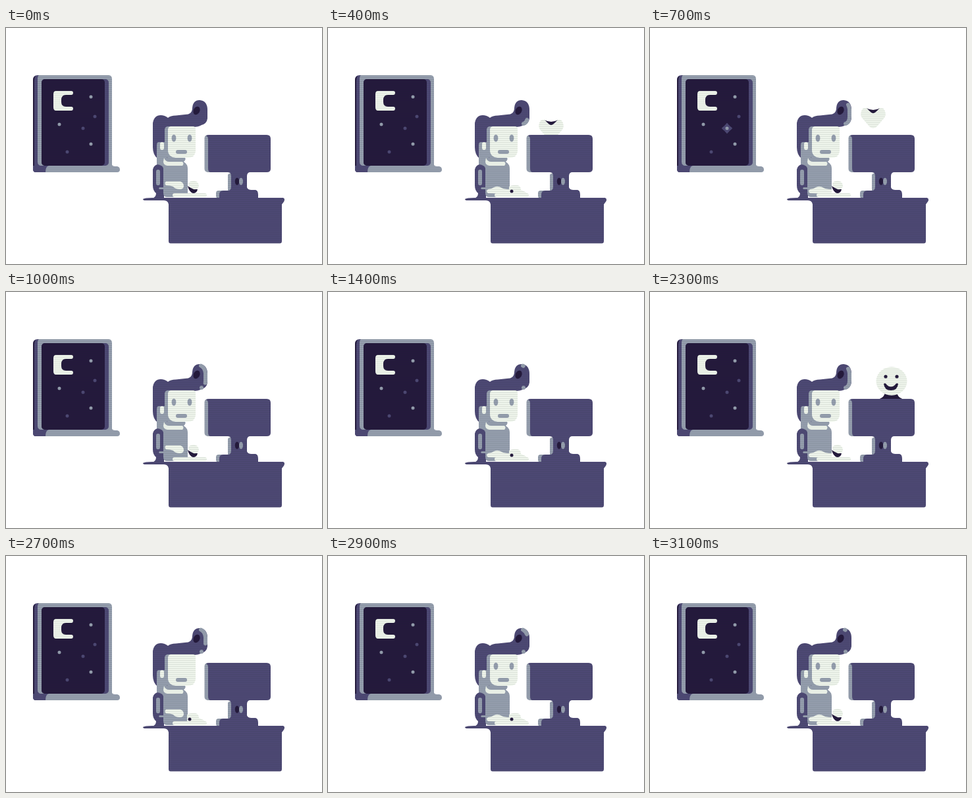
An HTML page for the animation above (3.2 s loop, 480 px wide and 360 px high).

```html
<!DOCTYPE html>
<html lang="en">
<head>
<meta charset="utf-8">
<title>Night desk</title>
<style>
  html, body { margin: 0; width: 100%; height: 100%; overflow: hidden; background: #fff; }
  svg { display: block; width: 100vw; height: 100vh; }
  .purple { fill: #4d4874; }
  .dark { fill: #24193c; }
  .gray { fill: #959eae; }
  .light { fill: #eff5ec; }
</style>
</head>
<body>
<svg viewBox="0 0 480 360">
  <defs>
    <clipPath id="aboveScreen"><rect x="300" width="110" height="165"/></clipPath>
    <filter id="scanlines" filterUnits="userSpaceOnUse" x="0" y="0" width="480" height="360" color-interpolation-filters="sRGB">
      <feFlood x="0" y="0" width="480" height="1" flood-color="#203028" flood-opacity=".1"/>
      <feOffset x="0" y="0" width="480" height="3"/>
      <feTile x="0" y="0" width="480" height="360" result="lines"/>
      <feComposite in="lines" in2="SourceGraphic" operator="atop"/>
    </filter>
  </defs>

  <g filter="url(#scanlines)">
  <g id="window">
    <path class="purple" d="M48 72H70V220H45Q41 220 41 215V79Q41 72 48 72Z"/>
    <path class="dark" d="M45 73Q41 75 41 80V213Q41 217 43 219V80Q43 76 45 73Z"/>
    <path class="gray" d="M50 72H156Q161 72 161 78V208Q161 211 166 211H169Q173 212 173 216T169 220H60V210H54Q48 210 48 204V78Q48 73 50 72Z"/>
    <path class="purple" d="M41 210H65Q60 211 60 220H45Q41 220 41 215Z"/>
    <rect class="purple" x="54" y="78" width="102" height="132" rx="5"/>
    <rect class="dark" x="54" y="78" width="96" height="132" rx="5"/>
    <path class="light" d="M76 96H99Q102 96 102 99T99 102H91Q84 102 84 110V113Q84 120 91 120H99Q102 120 102 123T99 126H76Q72 126 72 121V101Q72 96 76 96Z"/>
    <path id="spark" class="purple" stroke="#4d4874" stroke-width="2" stroke-linejoin="round"/>
    <g id="stars"></g>
  </g>

  <g id="popups" clip-path="url(#aboveScreen)">
    <path id="neck" class="dark"/>
    <g id="heart">
      <path class="dark" d="M-11 -14Q-5 -11 0 -11T11 -14L5 -5H-5Z"/>
      <path class="light" d="M0 -6C3 -6 6 -10 10 -14Q16 -15 18 -9Q20 -3 17 1L6 14Q0 20 -6 14L-17 1Q-20 -3 -18 -9Q-16 -15 -10 -14C-6 -10 -3 -6 0 -6Z"/>
    </g>
    <g id="smiley">
      <ellipse class="light" rx="23.5" ry="21.700"/>
      <circle class="dark" cx="-9" cy="-7" r="2.600"/>
      <circle class="dark" cx="8" cy="-7" r="2.600"/>
      <path class="dark" d="M-12 4Q-9 2 -7 6Q-1 11 5 6Q7 2 10 4Q9 14 -1 14T-12 4Z"/>
    </g>
  </g>

  <g id="desk">
    <rect class="gray" x="319" y="248" width="20" height="12" rx="4"/>
    <rect class="gray" x="337" y="222" width="12" height="28" rx="3"/>
    <rect class="gray" x="301.500" y="163" width="20" height="57" rx="5"/>
    <path class="purple" d="M308 163H396Q402 163 402 169V215Q402 220 396 220H370Q366 221 366 226V243Q367 247 373 247H379Q383 248 383 254V261H324V254Q324 248 330 248H337Q342 248 342 242V226Q342 220 337 220H311Q307 220 307 214V170Q307 165 304 165Q305 163 308 163Z"/>
    <ellipse class="dark" cx="351" cy="234" rx="3.200" ry="5.500"/>
    <ellipse class="gray" cx="357" cy="234" rx="3" ry="5.500"/>
    <path class="purple" d="M208 261Q210 259 222 259H421Q426 261 419 269V325Q419 328.500 416 328.500H250Q247 328.500 247 325V269Q246 263 240 263H212Q208 263 208 261Z"/>
  </g>

  <g id="person">
    <path class="purple" d="M223 145Q225 133 235 133Q241 133 246 137Q250 133.500 258 133.500L272 132Q283 132 283 122Q284 110 294 110Q306 111 306 125V138Q305 146 297 148Q293 151 284 151H250V200H240V260H222Q228 258 228 252Q223 248 223 240V216Q224 210 230 208V199Q223 193 223 182Z"/>
    <ellipse class="dark" cx="289.500" cy="126" rx="4.800" ry="6.500" transform="rotate(25 289.500 126)"/>
    <path id="glint" d="M297 146Q303 144 303 135V124Q302 115 296 112.500" fill="none" stroke="#959eae" stroke-width="6" stroke-linecap="round" pathLength="100"/>
    <path class="gray" d="M232 174H244V198H272Q274 200 270 204Q276 208 276 214V258H244Q239 258 239 251V246H234Q231 246 233 243H239V214Q238 209 229 208V179Q229 174 232 174Z"/>
    <rect class="gray" x="228" y="216" width="6" height="24" rx="3"/>
    <rect class="gray" x="241" y="150" width="20" height="48" rx="5"/>
    <path class="light" d="M250 150H284Q288 150 288 155V188Q287 198 276 198H258Q246 197 246 186V155Q246 151 250 150Z"/>
    <rect class="light" x="234" y="174" width="6" height="12" rx="3"/>
    <path class="light" d="M240 198Q242 204 248 204H268Q271 207 268 210H245Q239 209 239 204Z"/>
    <g id="eyes">
      <ellipse class="gray" cx="255" cy="168" rx="3.400" ry="5.500"/>
      <ellipse class="gray" cx="279" cy="168" rx="3.400" ry="5.500"/>
    </g>
    <rect class="gray" x="258" y="186" width="17" height="6" rx="3"/>
    <rect class="light" x="253" y="252" width="52" height="6" rx="3"/>
    <path id="nearUp" class="light" d="M243 234H265Q270 236 270 241Q270 246 264 246Q257 246 254 242Q250 240 243 240Q240 237 243 234Z"/>
    <path id="nearDown" class="light" d="M243 246Q248 246 252 243Q258 240 264 244Q268 246 276 246V253H258Q253 252 243 252Q239 249 243 246Z"/>
    <g id="farUp">
      <path class="dark" d="M276 241Q283 246 291 246Q290 252 284 252Q278 250 276 241Z"/>
      <path class="light" d="M277 237Q279 233 286 233Q293 235 293 241Q292 247 285 246Q277 243 277 237Z"/>
    </g>
    <g id="farDown">
      <path class="light" d="M275 242Q280 239 288 240Q293 241 293 247Q299 249 303 253H275Z"/>
      <circle class="dark" cx="279" cy="249" r="2.500"/>
    </g>
  </g>
  </g>
</svg>
<script>
const LOOP = 3200, STEP = 100;
const $ = id => document.getElementById(id);
const clamp = (v, lo = 0, hi = 1) => Math.min(hi, Math.max(lo, v));
const show = (el, on) => el.setAttribute('visibility', on ? 'visible' : 'hidden');

const stars = [[129, 105, 1], [135, 135, 0], [81, 147, 1], [117, 153, 0], [129, 177, 1], [93, 189, 0]]
  .map(([x, y, bright]) => {
    const c = document.createElementNS('http://www.w3.org/2000/svg', 'circle');
    c.setAttribute('cx', x);
    c.setAttribute('cy', y);
    c.setAttribute('r', 2.5);
    c.setAttribute('class', bright ? 'gray' : 'purple');
    $('stars').append(c);
    return c;
  });

const rise = [[0, 190], [3, 160], [7, 136], [9, 92], [10, 89]];

function along(points, p) {
  const i = clamp(points.findIndex(q => q[0] >= p), 1, points.length - 1);
  const [a, b] = [points[i - 1], points[i]];
  return a[1] + (b[1] - a[1]) * clamp((p - a[0]) / (b[0] - a[0]));
}

function popup(p, second) {
  const y = along(rise, p), visible = p > 0 && p < 10;
  show($('heart'), visible && !second);
  show($('smiley'), visible && second);
  $(second ? 'smiley' : 'heart').setAttribute('transform', `translate(${second ? 367 : 339} ${y})`);
  // dark pull that thins out as the face leaves the screen
  const w = clamp(21 - (p - 3) * 2.2, 6, 21), x = 366;
  show($('neck'), second && visible && p < 9);
  $('neck').setAttribute('d',
    `M${x - w - 5} 163Q${x - w + 3} 160 ${x - w + 3} 152Q${x} 157 ${x + w - 3} 152Q${x + w - 3} 160 ${x + w + 5} 163Z`);
  if (p < 5) $('popups').append($('neck'));
  else $('popups').prepend($('neck'));
}

function glint(p) {
  const head = clamp((p - 3) / 5 + .02), tail = Math.min(.98, clamp((p - 3) / 11) ** 3);
  const len = Math.max(.5, (head - tail) * 100);
  show($('glint'), p >= 3);
  $('glint').setAttribute('stroke-dasharray', `0 ${tail * 100} ${len} 300`);
}

function twinkle(n) {
  const r = 7 - 2.5 * Math.abs(n - 7), on = r > 1;
  show($('spark'), on);
  $('spark').setAttribute('d',
    `M117 ${153 - r}Q120 150 ${117 + r} 153Q120 156 117 ${153 + r}Q114 156 ${117 - r} 153Q114 150 117 ${153 - r}Z`);
  stars[3].setAttribute('class', on ? 'gray' : 'purple');
}

// both hands tap in turn, the far one a little ahead
function type(key) {
  const near = key < 4, far = (key + 1) % 8 < 4;
  show($('nearUp'), near);
  show($('nearDown'), !near);
  show($('farUp'), far);
  show($('farDown'), !far);
}

function draw(ms) {
  const n = Math.floor((ms % LOOP) / STEP), p = n % 16;
  popup(p, n >= 16);
  glint(p);
  twinkle(n);
  type(n % 8);
  show($('eyes'), n !== 26 && n !== 27);
}

const start = performance.now();
function tick() {
  draw(performance.now() - start);
  requestAnimationFrame(tick);
}
tick();
</script>
</body>
</html>
```
